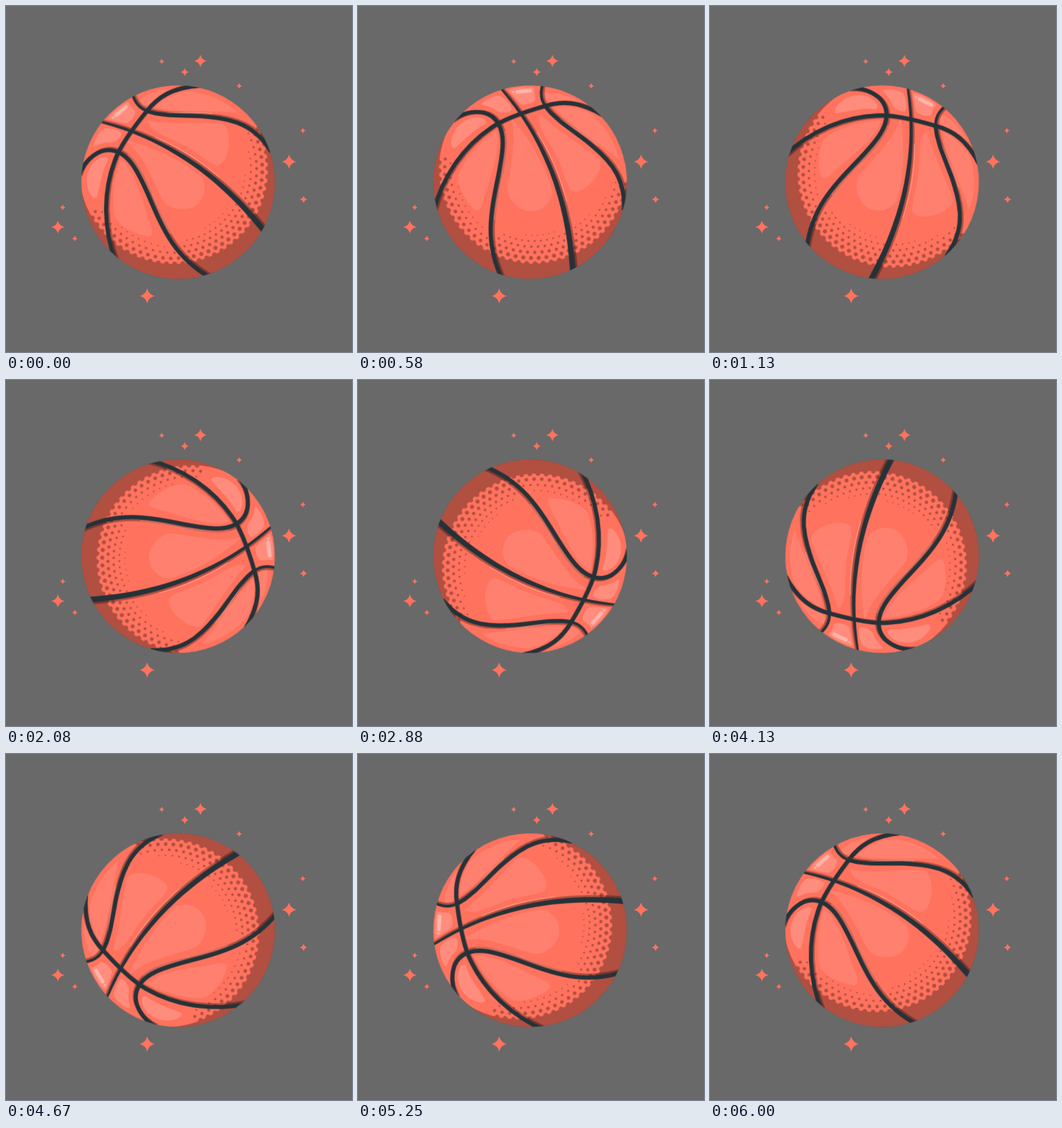
Write an HTML page that moves like this. It is 500x500 px and loops after 6040 ms.

```html
<!DOCTYPE html>
<html lang="en">
<head>
<meta charset="utf-8">
<title>Spinning basketball</title>
<style>
  html, body { margin: 0; width: 100%; height: 100%; overflow: hidden; background: #696969; }
  svg { display: block; width: 100vw; height: 100vh; }
  .coral { fill: #ff725e; }
  .gloss { fill: #fff; opacity: .1; }
  .bright { opacity: .19; }
  .line { fill: none; stroke: currentColor; stroke-width: 6; }
  .thin { stroke-width: 4; }
  .glint { fill: none; stroke: #fff; stroke-width: .7; opacity: .55; }
  #ball {
    transform-origin: 248.7px 254.6px;
    animation: spin 6040ms steps(145, end) -8ms infinite;
  }
  @keyframes spin {
    from { transform: rotate(.3deg); }
    to { transform: rotate(361deg); }
  }
</style>
</head>
<body>
<svg viewBox="0 0 500 500">
  <defs>
    <clipPath id="disc"><circle cx="248.7" cy="254.6" r="140"/></clipPath>
    <path id="star" d="M0-1Q.19-.19 1 0Q.19 .19 0 1Q-.19 .19-1 0Q-.19-.19 0-1Z"/>
    <g id="seams">
      <path class="line thin" d="M181 124C185 141 193 149 205 152.5"/>
      <path class="line" d="M203 152C230 161 262 157 292 160C330 163 360 173 383 210"/>
      <path class="line" d="M105 248C113 221 135 207 152 209C178 212 192 243 205 272C228 325 245 364 297 393"/>
      <path fill="currentColor" d="M130 165C216 183 302.5 229.5 377 322L371 328C297.5 234.5 214 188.5 130 168Z"/>
      <path class="line" d="M280 115C238 118 218 133 203 152C182 178 164 203 157 224C140 270 141 322 159 370"/>
    </g>
  </defs>

  <g id="stars" class="coral"></g>

  <g id="ball">
    <g clip-path="url(#disc)">
      <circle class="coral" cx="248.7" cy="254.6" r="140"/>

      <g class="gloss">
        <path d="M205 166C240 172 285 167 312 170C328 178 324 228 305 230C295 230 275 208 240 193C222 185 207 179 205 166Z"/>
        <path d="M172 194C215 204 255 224 282 246C292 262 287 282 270 291C255 296 240 294 229 284C212 255 200 215 172 194Z"/>
        <path d="M166 222C156 245 152 285 158 306C168 322 190 331 207 333C213 333 213 325 208 313C196 280 188 240 166 222Z"/>
        <path d="M192 138C200 128 222 120 238 119C226 124 214 134 206 143C200 146 193 143 192 138Z"/>
        <path d="M215 146C230 132 250 124 265 123C295 126 320 140 334 154C300 150 250 155 215 146Z"/>
      </g>
      <g class="gloss bright">
        <path d="M144 218C125 220 115 240 117 258C119 270 125 280 131 278C136 262 138 238 148 222Z"/>
        <path d="M143 177C155 177 170 182 166 187C162 195 155 199 145 198C135 199 128 204 126 203C128 193 134 181 143 177Z"/>
        <path d="M176 139C160 146 150 158 147 164C155 166 167 169 174 170C181 166 187 158 186 152C182 148 178 145 176 139Z"/>
      </g>

      <g fill="#fff" stroke="#fff" opacity=".36">
        <path d="M158.5 158.5L172.5 146.5" stroke-width="5.5" stroke-linecap="round"/>
        <circle cx="154" cy="162" r="1.6" stroke="none"/>
      </g>

      <g id="shade" opacity=".3">
        <path fill-rule="evenodd" d="M90 90H410V410H90ZM105.5 236.5a136.5 136.5 0 0 0 273 0a136.5 136.5 0 0 0-273 0Z"/>
      </g>

      <use href="#seams" x="2.3" y="-1.8" color="#000" opacity=".3"/>
      <path class="glint" d="M222 154.5C250 155.5 270 153 298 155.5"/>
      <path class="glint" d="M176 215C194 232 200 253 211 272C221 296 228 313 238 329"/>
      <path class="glint" d="M215 190C250 204 280 223 308 247"/>
      <use href="#seams" color="#263238"/>
    </g>
  </g>
</svg>
<script>
  const add = (parent, tag, attrs) => {
    const el = document.createElementNS('http://www.w3.org/2000/svg', tag);
    for (const key in attrs) el.setAttribute(key, attrs[key]);
    parent.append(el);
  };

  // x, y, half size
  const stars = [
    [281, 79.5, 9], [225, 80, 4], [258.3, 95.5, 6], [337, 115.5, 4],
    [429, 180, 4], [409, 225, 10.5], [430, 279.5, 5.5], [82, 291, 4],
    [75, 319.5, 9.5], [99.5, 336, 4], [204, 419, 11]
  ];
  for (const [x, y, size] of stars) {
    add(document.getElementById('stars'), 'use', {
      href: '#star', transform: `translate(${x} ${y}) scale(${size})`
    });
  }

  // Halftone dots shrink inward from the shadow's edge, in two patches.
  const rad = Math.PI / 180;
  const bandDepth = a => a < 82
    ? 42 * Math.cos(.85 * (a - 48) * rad)
    : 27 * Math.cos(1.2 * (a - 115) * rad);
  const shade = document.getElementById('shade');
  const step = 5;
  for (let row = 0; row < 6; row++) {
    const depth = row * 8.2;
    for (let a = -26 + (row % 2) * step / 2; a < 154; a += step) {
      const left = 1 - depth / bandDepth(a);
      if (left < 0) continue;
      add(shade, 'circle', {
        cx: 242 + (136.5 - depth) * Math.cos(a * rad),
        cy: 236.5 + (136.5 - depth) * Math.sin(a * rad),
        r: .8 + 2.6 * left
      });
    }
  }
</script>
</body>
</html>
```
